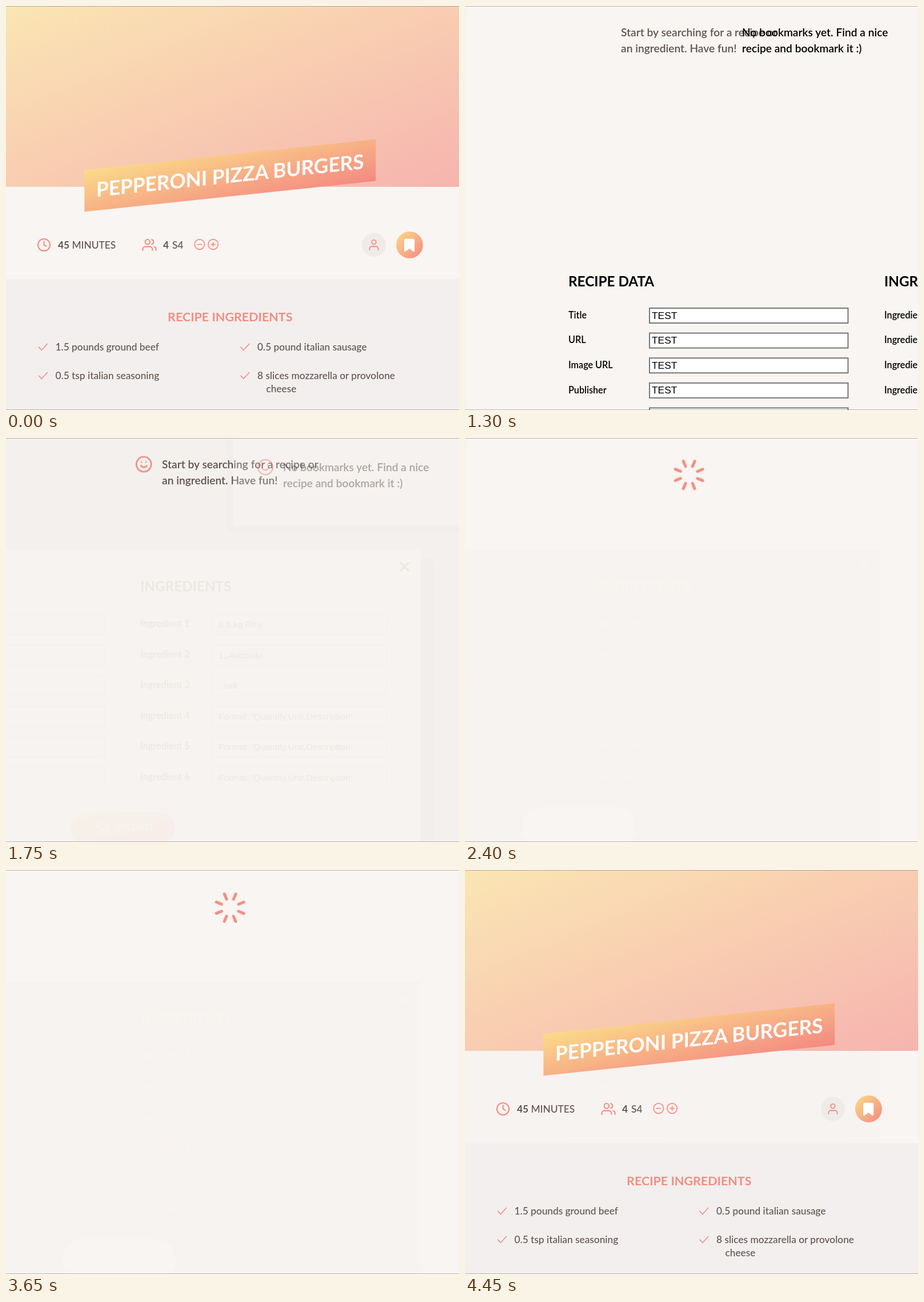
Recreate the animation shown at these times as an HTML page. Size 793x706 px, loop 4850 ms.

```html
<!DOCTYPE html>
<html lang="en">
<head>
<meta charset="utf-8">
<title>Recipe page reload</title>
<style>
html, body { margin: 0; width: 100%; height: 100%; overflow: hidden; background: #f9f5f2; }
svg { display: block; width: 793px; height: 706px; font-family: Lato, "Open Sans", sans-serif; }
text { fill: #615551; white-space: pre; }
.body { font-size: 17.3px; font-weight: 500; }
.bold { font-weight: 700; }
.message { font-size: 19.2px; font-weight: 600; }
.label { font-size: 16.2px; font-weight: 600; }
.heading { font-size: 24.3px; font-weight: 700; }
.field { font-family: "Liberation Sans", Arial, sans-serif; font-size: 15.5px; }
.raw text { fill: #000; }
.raw .field { font-size: 17.4px; }
.raw rect { fill: #fff; stroke: #767676; stroke-width: 2; }
.form text { fill: currentColor; }
.form .box { fill: none; stroke: currentColor; stroke-opacity: .35; }
.icon { fill: none; stroke: #f38e82; stroke-width: 2; stroke-linecap: round; stroke-linejoin: round; }

.recipe, .raw, .welcome, .styled, .smile, .loader, .marks {
  animation: 4850ms step-end infinite;
}
.recipe { animation-name: recipe; }
.raw { animation-name: raw; }
.welcome { animation-name: welcome; }
.styled, .smile { animation-name: styled; }
.loader { animation-name: loader; }
.marks { animation-name: marks; }
@keyframes recipe { 0% { opacity: 1 } 26.8% { opacity: 0 } 82.47%, 100% { opacity: 1 } }
@keyframes raw { 0% { opacity: 0 } 26.8% { opacity: 1 } 29.89%, 100% { opacity: 0 } }
@keyframes welcome { 0% { opacity: 0 } 26.8% { opacity: 1 } 42.26%, 100% { opacity: 0 } }
@keyframes styled { 0% { opacity: 0 } 29.89% { opacity: 1 } 42.26%, 100% { opacity: 0 } }
@keyframes loader { 0% { opacity: 0 } 42.26% { opacity: 1 } 82.47%, 100% { opacity: 0 } }
@keyframes marks { 0% { opacity: 0 } 40.2%, 100% { opacity: 1 } }

/* the modal and its overlay fade from 1400 ms, the popup 200 ms later */
.out, .in, .drift, .late-out, .late-in, .late-drop { animation: 4850ms ease infinite; }
.out { animation-name: out; }
.in { animation-name: in; }
.drift { animation-name: drift; }
.late-out { animation-name: late-out; }
.late-in { animation-name: late-in; }
.late-drop { animation-name: late-drop; }
@keyframes out { 0%, 28.866% { opacity: 1 } 39.175%, 100% { opacity: 0 } }
@keyframes in { 0%, 28.866% { opacity: 0 } 39.175%, 100% { opacity: 1 } }
@keyframes drift {
  0%, 28.866% { transform: translate(517px, 249px) }
  39.175%, 100% { transform: translate(-33px, -16px) }
}
@keyframes late-out { 0%, 32.99% { opacity: 1 } 43.299%, 100% { opacity: 0 } }
@keyframes late-in { 0%, 32.99% { opacity: 0 } 43.299%, 100% { opacity: 1 } }
@keyframes late-drop { 0%, 32.99% { transform: none } 43.299%, 100% { transform: translateY(10px) } }

.spin { animation: spin 4850ms linear infinite; }
@keyframes spin { from { transform: rotate(-364.5deg) } to { transform: rotate(508.5deg) } }
</style>
</head>
<body>
<svg viewBox="0 0 793 706">
  <defs>
    <linearGradient id="warm" x1="0" y1="0" x2="1" y2="1">
      <stop offset="0" stop-color="#fbdb89"/>
      <stop offset="1" stop-color="#f48982"/>
    </linearGradient>
    <g id="smile" class="icon">
      <circle cx="12" cy="12" r="10"/>
      <path d="M8 14s1.5 2 4 2 4-2 4-2M9 9h.01M15 9h.01"/>
    </g>
    <path id="check" d="M0 6l5 5.5 10-11" class="icon" style="stroke-width:1.6"/>
    <g id="form" class="form"></g>
  </defs>

  <rect width="793" height="706" fill="#f9f5f2"/>

  <g class="welcome">
    <text class="message" x="273" y="53">Start by searching for a recipe or</text>
    <text class="message" x="273" y="81">an ingredient. Have fun!</text>
    <use href="#smile" class="smile" transform="translate(225.6 30.2) scale(1.3)"/>
  </g>

  <g class="raw">
    <text class="message" x="485" y="53">No bookmarks yet. Find a nice</text>
    <text class="message" x="485" y="81">recipe and bookmark it :)</text>
    <text class="heading" x="181" y="489.5">RECIPE DATA</text>
    <text class="heading" x="734" y="489.5">INGREDIENTS</text>
    <g id="rawRows"></g>
  </g>

  <g class="styled">
    <g class="late-out">
      <g class="late-in">
        <rect x="375" y="-40" width="460" height="218" rx="26" fill="#615551" opacity=".03"/>
        <rect x="386" y="-40" width="460" height="205" rx="16" fill="#615551" opacity=".03"/>
        <rect x="397" y="-10" width="420" height="163" rx="4" fill="#fff"/>
      </g>
      <g class="late-drop">
        <use href="#smile" transform="translate(438.4 30.2) scale(1.3)"/>
        <text class="message" x="485" y="53">No bookmarks yet. Find a nice</text>
        <text class="message" x="485" y="81">recipe and bookmark it :)</text>
      </g>
    </g>
    <g class="out"><g class="in"><rect width="793" height="706" opacity=".4"/></g></g>
  </g>

  <!-- faint panel that stays behind the page after the modal has gone -->
  <g class="in">
    <rect x="-20" y="195" width="746" height="530" rx="5" fill="#f7f3f1"/>
    <g class="marks" color="#f9f5f2">
      <use href="#form" opacity=".8" transform="translate(0 -1)"/>
      <rect x="98" y="645" width="200" height="70" rx="35" fill="#f9f5f2"/>
    </g>
  </g>

  <g class="styled"><g class="out"><g class="drift">
    <g class="in">
      <rect x="-349" y="210" width="1100" height="620" rx="9" opacity=".15"/>
      <rect x="-374" y="194" width="1100" height="620" rx="9" fill="#fff"/>
    </g>
    <use href="#form" color="#3d3532"/>
    <rect x="113" y="655" width="184" height="54" rx="27" fill="url(#warm)"/>
    <path d="M161 689a6 6 0 0 1 1-11 8 8 0 0 1 15 2 5 5 0 0 1-1 9M169 692v-10m-4 4l4-4 4 4" class="icon" style="stroke:#fff"/>
    <text class="body" x="190" y="687" style="fill:#fff;font-weight:600;font-size:16.5px">UPLOAD</text>
  </g></g></g>

  <g class="loader" transform="translate(392.5 65.2)">
    <g class="spin">
      <g id="spokes" transform="translate(-.8 0)" stroke="#f38e82" stroke-width="5" stroke-linecap="round"></g>
    </g>
  </g>

  <g class="recipe">
    <rect width="793" height="316" fill="#f9f5f3"/>
    <rect width="793" height="316" fill="url(#warm)" opacity=".6"/>
    <g transform="translate(392.3 296.1) skewY(-6)">
      <rect x="-255" y="-36.5" width="510" height="73" fill="url(#warm)"/>
      <text class="bold" y="12.8" text-anchor="middle" style="fill:#fff;font-size:35.2px">PEPPERONI PIZZA BURGERS</text>
    </g>

    <g class="icon">
      <g transform="translate(53.9 404.9) scale(1.05)">
        <circle cx="12" cy="12" r="10"/><path d="M12 6v6l4 2"/>
      </g>
      <g transform="translate(238.4 404.9) scale(1.05)">
        <circle cx="9" cy="7" r="4"/>
        <path d="M17 21v-2a4 4 0 0 0-4-4H5a4 4 0 0 0-4 4v2M23 21v-2a4 4 0 0 0-3-3.87M16 3.13a4 4 0 0 1 0 7.75"/>
      </g>
      <g transform="translate(328.4 406.2) scale(.87)">
        <circle cx="12" cy="12" r="10"/><path d="M8 12h8"/>
      </g>
      <g transform="translate(352.2 406.2) scale(.87)">
        <circle cx="12" cy="12" r="10"/><path d="M8 12h8M12 8v8"/>
      </g>
    </g>
    <text class="body" x="91" y="423.5"><tspan class="bold">45</tspan> MINUTES</text>
    <text class="body bold" x="275" y="423.5">4</text>
    <text class="body" x="291" y="423.5">S4</text>

    <circle cx="644" cy="417.5" r="21" fill="#eeebe9"/>
    <g class="icon" transform="translate(632.6 406) scale(.95)">
      <circle cx="12" cy="7" r="4"/><path d="M20 21v-2a4 4 0 0 0-4-4H8a4 4 0 0 0-4 4v2"/>
    </g>
    <circle cx="706.5" cy="417.5" r="23.5" fill="url(#warm)"/>
    <path class="icon" transform="translate(692.6 404.6) scale(1.13)" style="fill:#fff;stroke:#fff"
      d="M19 21l-7-5-7 5V5a2 2 0 0 1 2-2h10a2 2 0 0 1 2 2z"/>

    <rect y="477" width="793" height="229" fill="#f2efee"/>
    <text class="bold" x="392.3" y="551" text-anchor="middle" style="fill:#f38e82;font-size:21.5px">RECIPE INGREDIENTS</text>
    <g id="items"></g>
  </g>

  <path d="M0 .5h793M0 705.5h793" stroke="#000" stroke-opacity=".25"/>
</svg>
<script>
const put = (id, parts) => { document.getElementById(id).innerHTML = parts.join(""); };
const text = (cls, x, y, s) => `<text class="${cls}" x="${x}" y="${y}">${s}</text>`;

put("items", [
  [57.3, 601.5, "1.5 pounds ground beef"],
  [410.8, 601.5, "0.5 pound italian sausage"],
  [57.3, 651.5, "0.5 tsp italian seasoning"],
  [410.8, 651.5, "8 slices mozzarella or provolone"],
].map(([x, y, s]) =>
  `<use href="#check" x="${x}" y="${y - 11.5}"/>` + text("body", x + 29.3, y, s)
).concat(text("body", 455.5, 674.5, "cheese")));

const labels = ["Title", "URL", "Image URL", "Publisher", "Prep time", "Servings"];
put("rawRows", labels.slice(0, 5).map((label, i) => {
  const y = 528 + i * 43.6;
  return `<rect x="323" y="${y}" width="347.5" height="26"/>`
    + text("label", 181, y + 17.7, label)
    + text("field", 327, y + 18.5, "TEST")
    + text("label", 734, y + 17.7, "Ingredient " + (i + 1));
}));

const format = "Format: 'Quantity,Unit,Description'";
const values = ["0.5,kg,Rice", "1,,Avocado", ",,salt", format, format, format];
const row = (x, y, label, value) =>
  text("label", x, y + 22, label)
  + `<rect class="box" x="${x + 125.5}" y="${y}" width="306" height="35" rx="4"/>`
  + text("field", x + 137, y + 23, value);
put("form", [
  text("heading", 236, 269, "INGREDIENTS"),
  `<path d="M691 218l15 15m0-15l-15 15" stroke="currentColor" stroke-width="3.5"/>`,
  ...values.map((value, i) => {
    const y = 308.5 + i * 53.6;
    return row(236, y, "Ingredient " + (i + 1), value) + row(-258, y, labels[i], "TEST");
  }),
]);

put("spokes", Array.from({ length: 8 }, (_, i) =>
  `<path d="M0-16V-26" transform="rotate(${i * 45})"/>`));
</script>
</body>
</html>
```
